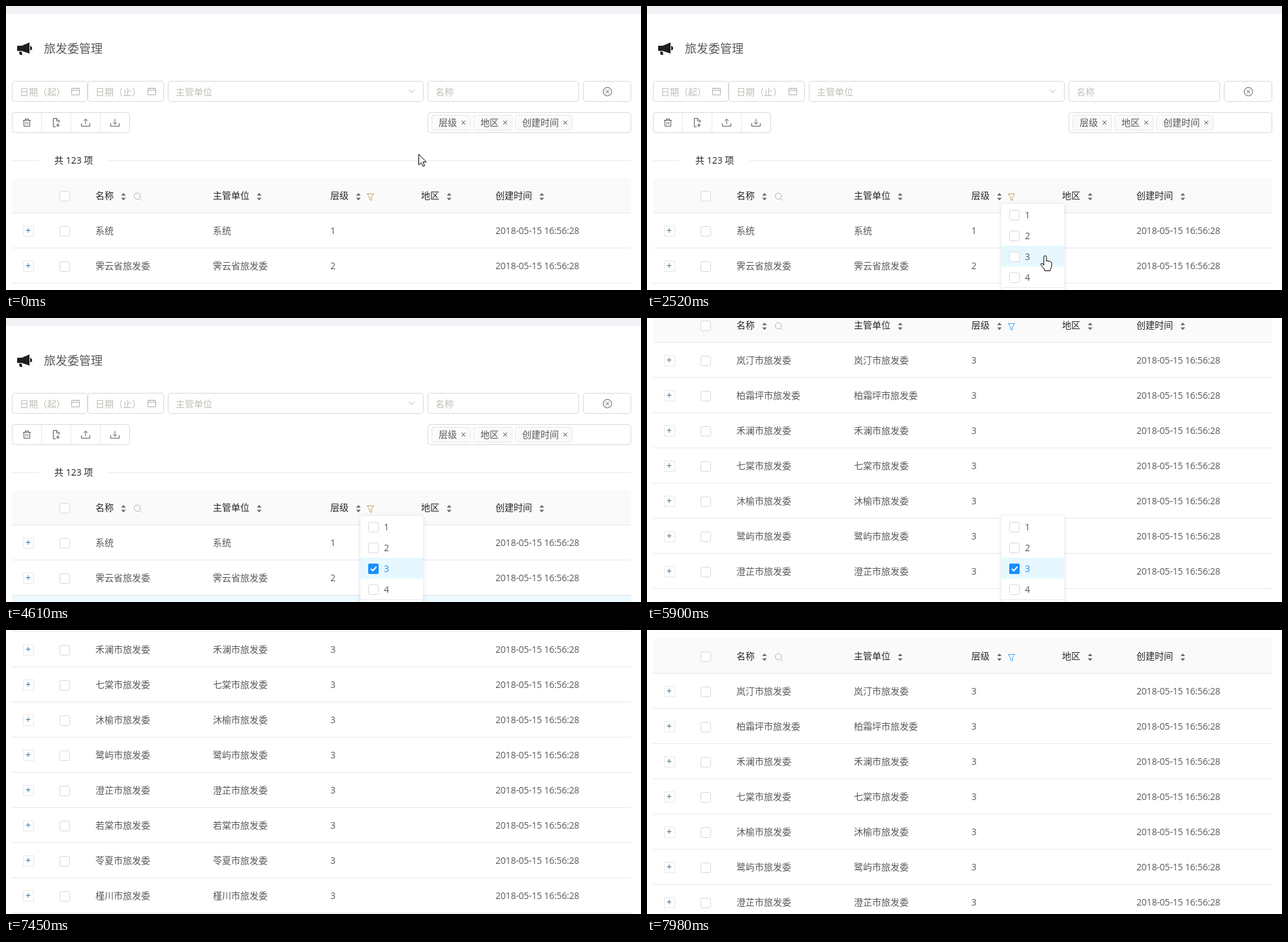
An HTML page that plays this animation: 973x436 px, repeating every 8 s.

```html
<!DOCTYPE html>
<html lang="zh-CN">
<head>
<meta charset="utf-8">
<title>旅发委管理</title>
<style>
html, body { margin: 0; width: 100%; height: 100%; overflow: hidden; background: #fff; }
svg { display: block; }
text { font: 14px "Open Sans", "Noto Sans", "Noto Sans CJK SC", "Noto Sans CJK", sans-serif; fill: #595959; white-space: pre; }
.title { font-size: 18px; }
.dark { fill: #262626; }
.hint { fill: #bfbfb8; }
.date { letter-spacing: -.2px; }
.plus { fill: #43708f; text-anchor: middle; }
.box { fill: #fff; stroke: #d9d9d9; }
.tag { fill: #fafafa; stroke: #e8e8e8; }
.bar { fill: #fafafa; }
.rule { fill: none; stroke: #e8e8e8; }
.sort { fill: #706772; }
.icon { fill: none; stroke: #5c5852; }
.pale { fill: none; stroke: #b3b3b3; }
.hover { fill: #e6f7ff; }
#funnel { fill: none; stroke: #bfa367; }
#menu { transform-origin: 543px 304px; }
#panel { fill: #fff; filter: drop-shadow(0 1px 3px rgba(0, 0, 0, .13)); }
.cursor { fill: #fff; stroke: #000; stroke-linejoin: round; }
</style>
</head>
<body>
<svg width="973" height="436" viewBox="0 0 973 436">
  <g id="page">
    <rect width="973" height="12" fill="#f0f2f5"/>
    <path fill="#1f1f1f" d="M18 61H24L36 56V73L24 69H18Q17 69 17 68V62Q17 61 18 61ZM20 70H24L25 75H21ZM37 61Q40 62 40 65T37 68Z"/>
    <text class="title" x="58" y="72">旅发委管理</text>
    <g id="form"></g>
    <path class="rule" d="M9 237.5H50M157 237.5H958"/>
    <text class="dark" x="74" y="242">共 123 项</text>
    <g id="head"></g>
    <g id="before"></g>
    <g id="after"></g>
  </g>
  <g id="menu">
    <rect id="panel" x="543" y="304" width="96" height="170" rx="3"/>
    <rect id="hover" class="hover" x="543" y="304" width="96" height="32"/>
    <rect id="chosen" class="hover" x="543" y="368" width="96" height="32"/>
    <g id="items"></g>
    <g id="tick">
      <rect x="555" y="377" width="16" height="16" rx="2" fill="#1890ff"/>
      <path d="M559 385l3 3l5.5 -6" fill="none" stroke="#fff" stroke-width="2"/>
    </g>
    <path class="rule" d="M543 432.5H639"/>
  </g>
  <path id="arrow" class="cursor" d="M.5 .5V17L4.3 13.4L7 19.3L9.5 18.2L7 12.5H12Z"/>
  <path id="hand" class="cursor" d="M-2 14V2Q-2 .5 0 .5T2 2V9Q2 7.5 4 8T5.5 9.5Q6 8.5 7.5 9T9 10.5Q10 10 10 11V16Q10 19 8 21V23.5H-1V21Q-4 18 -6.5 14Q-6.5 12 -5 12T-2 15Z"/>
</svg>
<script>
const LOOP = 8000;
const $ = id => document.getElementById(id);
const text = (x, y, s, c = '') => `<text class="${c}" x="${x}" y="${y}">${s}</text>`;
const path = (d, c) => `<path class="${c}" d="${d}"/>`;
const frame = (x, y, w, h, c = 'box', r = 4) =>
  `<rect class="${c}" x="${x + .5}" y="${y + .5}" width="${w - 1}" height="${h - 1}" rx="${r}"/>`;
const check = (x, y) => frame(x, y, 16, 16, 'box', 2);

// Search form and toolbar
const field = (x, w, s) => frame(x, 115, w, 32) + text(x + 12, 137, s, 'hint');
const calendar = x => path(`M${x + .5} 126.5h12v10h-12zm0 3h12m-9 -4.5v3m6 -3v3`, 'pale');
const tag = (x, w, s) => frame(x, 167, w, 24, 'tag', 2) + text(x + 11, 184, s)
  + path(`M${x + w - 14} 176l6 6m0 -6l-6 6`, 'icon');
const tray = x => `M${x - 6.5} 180v4.5h13v-4.5M${x} 173.5v8`;

$('form').innerHTML =
  field(9, 116, '日期（起）') + calendar(100) + field(125, 117, '日期（止）') + calendar(217) +
  field(248, 392, '主管单位') + path('M617.5 128.5l4 4.5l4 -4.5', 'pale') +
  field(646, 232, '名称') + frame(884, 115, 74, 32) +
  path('M915 131.5a6.5 6.5 0 1 0 13 0a6.5 6.5 0 1 0 -13 0m4 -2.5l5 5m0 -5l-5 5', 'icon') +
  frame(9, 163, 181, 32) + path('M54.5 163v32m45 -32v32m45 -32v32', 'rule') +
  path('M26 175.5h12m-8.5 -.5v-1.5h5v1.5m-7 1v8.5h9v-8.5m-6 2v4m3 -4v4', 'icon') +
  path('M76 185.5h-3.5v-13h5.5l3.5 3.5v3m-4 -6v3.5h3.5m-1.5 3.5v6m-3 -3h6', 'icon') +
  path(tray(122) + 'm-3 -5l3 -3l3 3', 'icon') + path(tray(167) + 'm-3 -3l3 3l3 -3', 'icon') +
  frame(646, 163, 312, 32) + tag(652, 60, '层级') + tag(716, 60, '地区') + tag(780, 88, '创建时间');

// Table
const column = (x, s) => {
  const mid = x + 14 * s.length + 15;
  return text(x, 296, s, 'dark') + path(`M${mid - 3.5} 291l3.5 -4l3.5 4zm0 3.5l3.5 4l3.5 -4z`, 'sort');
};

$('head').innerHTML =
  path('M9 318V268Q9 264 13 264H954Q958 264 958 268V318Z', 'bar') +
  path('M9 317.5H958', 'rule') + check(82, 284) +
  column(137, '名称') + column(317, '主管单位') + column(497, '层级') +
  column(636, '地区') + column(750, '创建时间') +
  path('M196.5 292a4.8 4.8 0 1 0 9.6 0a4.8 4.8 0 1 0 -9.6 0m8.3 3.5l3.4 3.4', 'pale') +
  '<path id="funnel" d="M553.5 288.5h10l-3.5 5v5l-3 -1.5v-3.5z"/>';

function row(i, name, level) {
  const y = 318 + 54 * i;
  return path(`M9 ${y + 53.5}H958`, 'rule') +
    frame(26, y + 19, 17, 17, 'rule', 0) + text(34, y + 32, '+', 'plus') +
    check(82, y + 20) + text(137, y + 32, name) + text(317, y + 32, name) +
    text(497, y + 32, level) + text(750, y + 32, '2018-05-15 16:56:28', 'date');
}

const cities = '岚汀 柏霜坪 禾澜 七棠 沐榆 鹭屿 澄芷 若棠 苓夏 槿川'.split(' ');
$('before').innerHTML = '<rect id="third" class="hover" x="9" y="426" width="949" height="53"/>' +
  row(0, '系统', 1) + row(1, '霁云省旅发委', 2);
$('after').innerHTML = cities.map((c, i) => row(i, c + '市旅发委', 3)).join('') +
  path('M9 858h949v53h-949z', 'bar') + text(25, 891, '共 123 项');

$('items').innerHTML = [1, 2, 3, 4].map(n => {
  const y = 272 + 32 * n;
  return check(555, y + 9) + `<text id="label${n}" x="579" y="${y + 22}">${n}</text>`;
}).join('');

// A track starts at some values; each leg [from, to, steps, values, power] moves on to new ones
function track(start, ...legs) {
  const keys = [[0, start]];
  let last = start;
  for (const [t0, t1, n, goal, power = 1] of legs) {
    for (let i = 0; i < n; i++) {
      const p = ((i + 1) / n) ** power;
      keys.push([t0 + (t1 - t0) * i / Math.max(n - 1, 1), last.map((v, k) => v + (goal[k] - v) * p)]);
    }
    last = goal;
  }
  return keys;
}

const sheet = document.head.appendChild(document.createElement('style'));
function play(id, prop, keys, css) {
  const rules = [...keys, [LOOP, keys.at(-1)[1]]]
    .map(([ms, v]) => `${ms * 100 / LOOP}%{${prop}:${css(...v)}}`).join('');
  sheet.textContent += `@keyframes ${id}-${prop}{${rules}}\n`;
  const s = $(id).style;
  const own = `${id}-${prop} ${LOOP}ms step-end infinite`;
  s.animation = s.animation ? `${s.animation}, ${own}` : own;
}
const move = (id, keys) => play(id, 'transform', keys, (x, y) => `translate(${Math.round(x)}px,${Math.round(y)}px)`);
const fade = (id, keys) => play(id, 'opacity', keys, v => v);
const tint = (id, prop, ms, from, to) => play(id, prop, [[0, [from]], [ms, [to]]], v => v);
const show = (id, from, to = LOOP) =>
  fade(id, [[0, [+(from === 0)]], [from, [1]], [to, [+(to === LOOP)]]].slice(from ? 0 : 1));

// Motion
const confirmed = 5900, ticked = 3180;

move('arrow', track([632, 227],
  [450, 780, 4, [600, 311]], [890, 1000, 2, [594, 304]], [1160, 1440, 4, [558, 288]]));
show('arrow', 0, 1440);

const hand = track([557, 288],
  [1980, 2520, 6, [610, 383], .8], [2610, ticked, 6, [586, 377]],
  [3500, 3610, 2, [585, 376]], [3840, 4280, 5, [600, 445], 1.6]);
move('hand', hand);
show('hand', 1440, 4280);

// The highlight follows the item under the hand
const under = hand.map(([ms, [, y]]) => [ms, [Math.floor((y - 304) / 32)]]);
play('hover', 'transform', under, k => `translateY(${32 * k}px)`);
play('hover', 'opacity', under, k => +(k >= 0 && k < 4));

fade('menu', track([0], [1760, 1870, 2, [1]], [6020, 6140, 2, [0]]));
play('menu', 'transform', track([.8], [1760, 1870, 2, [1]], [6020, 6140, 2, [.8]]), v => `scaleY(${v})`);
show('chosen', ticked);
show('tick', ticked);
tint('label3', 'fill', ticked, '#595959', '#1890ff');

fade('third', track([0], [4400, 4710, 4, [1]]));
show('before', 0, confirmed);
show('after', confirmed);
tint('funnel', 'stroke', confirmed, '#bfa367', '#45a3f0');

move('page', track([0, 0], [confirmed, 6140, 3, [0, -492], .513], [7210, 7980, 8, [0, -251], 1.27]));
</script>
</body>
</html>
```
